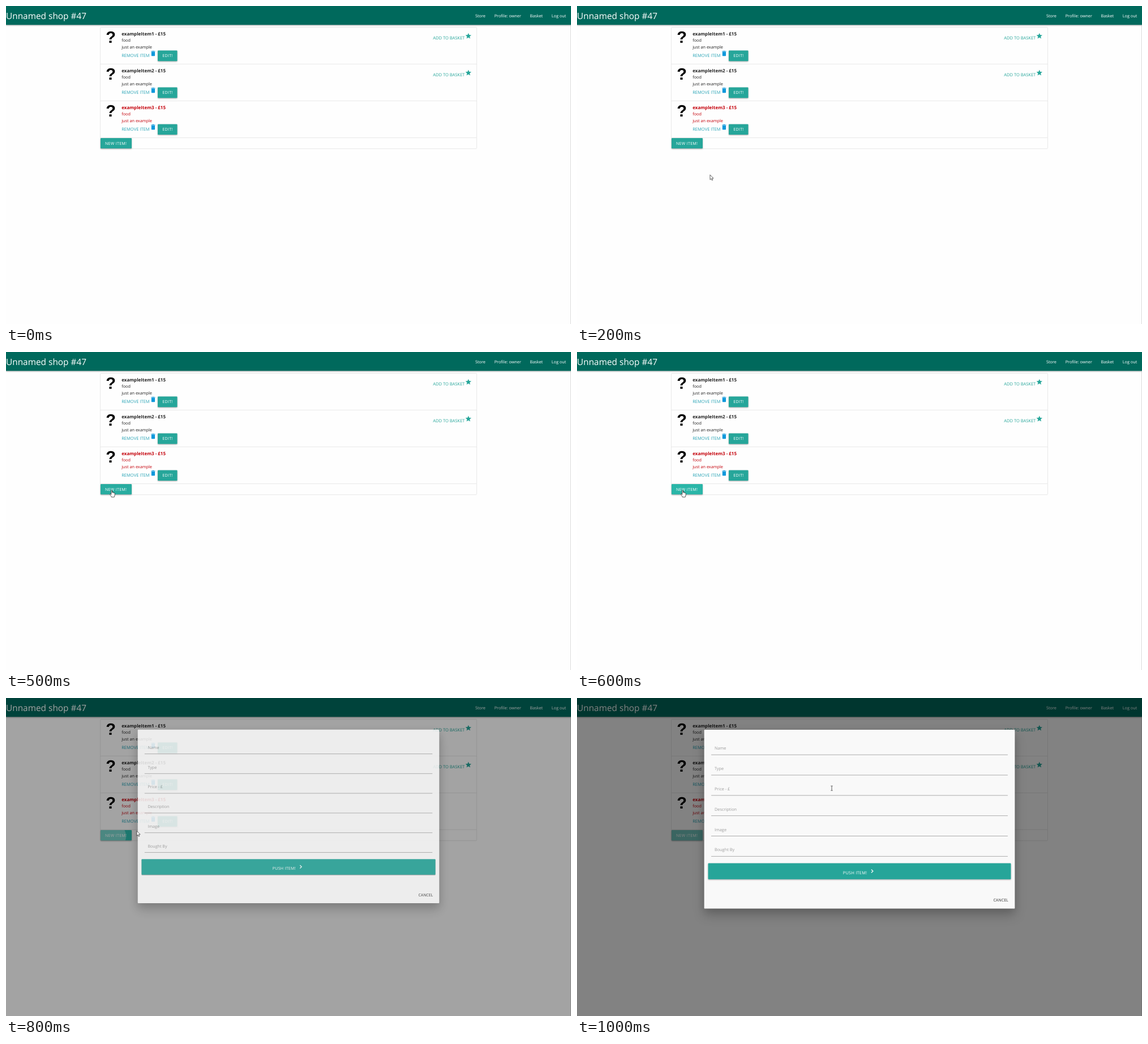
These frames come from a looping animation (998x561 px, 1100 ms). An HTML page:

```html
<!DOCTYPE html>
<html lang="en">
<head>
<meta charset="utf-8">
<title>Unnamed shop</title>
<style>
  html, body { margin: 0; width: 100%; height: 100%; overflow: hidden; background: #fefefe; }
  svg { display: block; width: 998px; height: 561px; }
  text { font: 7.31px "Open Sans", "Noto Sans", sans-serif; fill: #222; text-rendering: geometricPrecision; white-space: pre; }
  .brand { font-size: 15.4px; }
  .light { fill: #fff; }
  .title { font-size: 8px; font-weight: 700; }
  .mark { font: 700 29px "Liberation Sans", Arial, sans-serif; text-anchor: middle; fill: #000; }
  .btn { font-size: 7.1px; letter-spacing: .26px; fill: #fff; }
  .push { font-size: 7.35px; }
  .remove { font-size: 7.55px; fill: #27a3b5; }
  .add { font-size: 7.5px; fill: #26a69a; }
  .sold text:not(.mark):not(.remove):not(.btn) { fill: #c4000a; }
  .label { font-size: 7.35px; fill: #9e9e9e; }
  .cancel { font-size: 7.1px; fill: #343434; }
  .status { font-size: 5.95px; fill: #f4f4f4; }
  .rule { stroke: #e0e0e0; stroke-width: .7; fill: none; }
  .field { stroke: #9a9a9a; stroke-width: .8; }
  .teal { fill: #26a69a; }
  .raised { filter: drop-shadow(0 1px .8px rgba(0, 0, 0, .32)); }
  .sheet { fill: #fafafa; filter: drop-shadow(0 12px 10px rgba(0, 0, 0, .16)) drop-shadow(0 4px 7px rgba(0, 0, 0, .16)); }
</style>
</head>
<body>
<svg viewBox="0 0 998 561" xmlns="http://www.w3.org/2000/svg">
  <defs>
    <clipPath id="newClip"><rect x="167" y="233" width="55" height="18.3" rx="1"/></clipPath>
    <g id="arrow">
      <path d="M0 0V8.6L2 6.8 3.4 9.8 4.8 9.1 3.5 6.2H6.1Z" fill="#fff" stroke="#222" stroke-width=".7" stroke-linejoin="round"/>
    </g>
    <g id="hand">
      <path d="M-1.2 .8C-1.2-.3 .5-.3 .5 .8V4.2C1-.1 2 3.6 2.2 4.5 2.7 3.8 3.7 4 3.8 4.9 4.4 4.4 5.2 4.7 5.2 5.6V8.2C5.2 9.8 4.3 10.5 4.2 12H-.7C-.9 10.4-2.5 9-3.4 7.2-3.8 6.2-2.6 5.8-1.2 7.5Z" fill="#fff" stroke="#222" stroke-width=".75" stroke-linejoin="round"/>
    </g>
    <g id="beam">
      <path d="M-1.7-4H-.4L0-3.7 .4-4H1.7M0-3.7V3.7M-1.7 4H-.4L0 3.7 .4 4H1.7" fill="none" stroke="#333" stroke-width=".8"/>
    </g>
  </defs>

  <rect width="998" height="561" fill="#fefefe"/>
  <path d="M997.5 34V561" stroke="#d2d2d2" stroke-width=".8"/>
  <rect class="raised" width="998" height="33.3" fill="#00695c"/>
  <text class="brand light" x="0" y="23.2">Unnamed shop #47</text>
  <g id="nav"></g>

  <rect class="rule" x="166.6" y="37.7" width="664.8" height="214" rx="1"/>
  <g id="items"></g>
  <rect id="newBtn" class="raised" x="167" y="233" width="55" height="18.3" rx="1"/>
  <circle id="ripple" cx="187" cy="244" fill="#fff" fill-opacity=".35" clip-path="url(#newClip)"/>
  <text class="btn" x="175" y="244.7">NEW ITEM!</text>

  <rect id="shade" width="998" height="561"/>
  <g id="modal">
    <rect class="sheet" x="224.55" y="56.1" width="548.9" height="315.6" rx="1"/>
    <g id="fields"></g>
    <rect class="teal raised" x="231.5" y="291.6" width="535" height="28.3" rx="1"/>
    <text class="btn push" x="469.8" y="311.4">PUSH ITEM!</text>
    <path transform="translate(515.2 299.3) scale(.52)" d="M10 6L8.59 7.41 13.17 12l-4.58 4.59L10 18l6-6z" fill="#fff" stroke="#fff" stroke-width=".7"/>
    <text class="cancel" x="735.5" y="359.6">CANCEL</text>
  </g>

  <g id="status">
    <rect y="550" width="217.7" height="11" fill="#8a8a8a"/>
    <text class="status" x="2" y="557.8">https://8080-aquamarine-tiger-5l58lwo8.ws-eu17.gitpod.io/store#modalNew</text>
  </g>
  <use id="cursor"/>
</svg>
<script>
  const el = id => document.getElementById(id);
  const text = (cls, x, y, s) => `<text class="${cls}" x="${x}" y="${y}">${s}</text>`;
  const icon = (x, y, fill, d) => `<path transform="translate(${x} ${y}) scale(.52)" fill="${fill}" d="${d}"/>`;
  const BIN = "M6 19c0 1.1.9 2 2 2h8c1.1 0 2-.9 2-2V7H6v12zM19 4h-3.5l-1-1h-5l-1 1H5v2h14V4z";
  const STAR = "M12 17.27L18.18 21l-1.64-7.03L22 9.24l-7.19-.61L12 2 9.19 8.63 2 9.24l5.46 4.73L5.82 21z";

  el("nav").innerHTML = [["Store", 829], ["Profile: owner", 862.7], ["Basket", 925.5], ["Log out", 963.7]]
    .map(([s, x]) => text("light", x, 19.6, s)).join("");

  el("items").innerHTML = [1, 2, 3].map(n => {
    const sold = n === 3;
    return `<g transform="translate(0 ${(n - 1) * 64.95})" class="${sold ? "sold" : ""}">
      <path class="rule" d="M166.6 102.4H831.4"/>
      ${text("mark", 185, 64.8, "?")}
      ${text("title", 204.2, 51.8, `exampleItem${n} - £15`)}
      ${text("", 204.2, 63.3, "food")}
      ${text("", 204.2, 74.8, "just an example")}
      ${text("remove", 204.2, 89.7, "REMOVE ITEM")}
      ${icon(253.7, 77.4, "#0e98db", BIN)}
      <rect class="teal raised" x="268" y="78.6" width="34.5" height="18.6" rx="1"/>
      ${text("btn", 276.3, 90.4, "EDIT!")}
      ${sold ? "" : text("add", 754.3, 58.7, "ADD TO BASKET") + icon(810.5, 46.6, "#26a69a", STAR)}
    </g>`;
  }).join("");

  el("fields").innerHTML = ["Name", "Type", "Price - £", "Description", "Image", "Bought By"].map((s, i) => {
    const y = 100.2 + i * 35.85;
    return text("label", 242.8, y - 8.9, s) + `<path class="field" d="M237 ${y}H761"/>`;
  }).join("");

  // One pose per 100 ms: cursor, button hover, ripple radius,
  // and "left", the remaining share of the modal's opening time.
  const STEP = 100;
  const poses = [
    {},
    { cursor: ["arrow", 234.5, 301] },
    { cursor: ["arrow", 235, 297.8] },
    { cursor: ["arrow", 215, 273] },
    { cursor: ["hand", 190, 246] },
    { cursor: ["hand", 187, 244], hover: .3 },
    { cursor: ["hand", 187, 244], hover: .75 },
    { cursor: ["arrow", 186.6, 243.7], hover: 1, status: true },
    { cursor: ["arrow", 231, 234.5], hover: 1, ripple: 25, left: .53 },
    { cursor: ["beam", 372, 201.6], hover: .3, ripple: 32.5, left: .3 },
    { cursor: ["beam", 450, 159.2], ripple: 60, left: .13 }
  ];

  const mix = (a, b, k) => `rgb(${a.map((v, i) => Math.round(v + (b[i] - v) * k))})`;
  const show = (node, on) => { node.style.display = on ? "" : "none"; };

  function draw({ cursor, hover = 0, ripple = 0, left = 1, status = false }) {
    show(el("cursor"), cursor);
    if (cursor) {
      const [shape, x, y] = cursor;
      el("cursor").setAttribute("href", "#" + shape);
      el("cursor").setAttribute("transform", `translate(${x} ${y})`);
    }
    el("newBtn").style.fill = mix([38, 166, 154], [43, 187, 173], hover);
    el("ripple").setAttribute("r", ripple);
    show(el("status"), status);

    const p = 1 - left ** 3;
    el("shade").style.opacity = .5 * (1 - left ** 2);
    show(el("modal"), p > 0);
    el("modal").style.opacity = p;
    el("modal").setAttribute("transform",
      `translate(499 ${213.9 - 33.7 * (1 - p)}) scale(${.8 + .2 * p}) translate(-499 -213.9)`);
  }

  const start = performance.now();
  function tick() {
    const step = Math.floor((performance.now() - start) / STEP) % poses.length;
    draw(poses[step]);
    requestAnimationFrame(tick);
  }
  tick();
</script>
</body>
</html>
```
